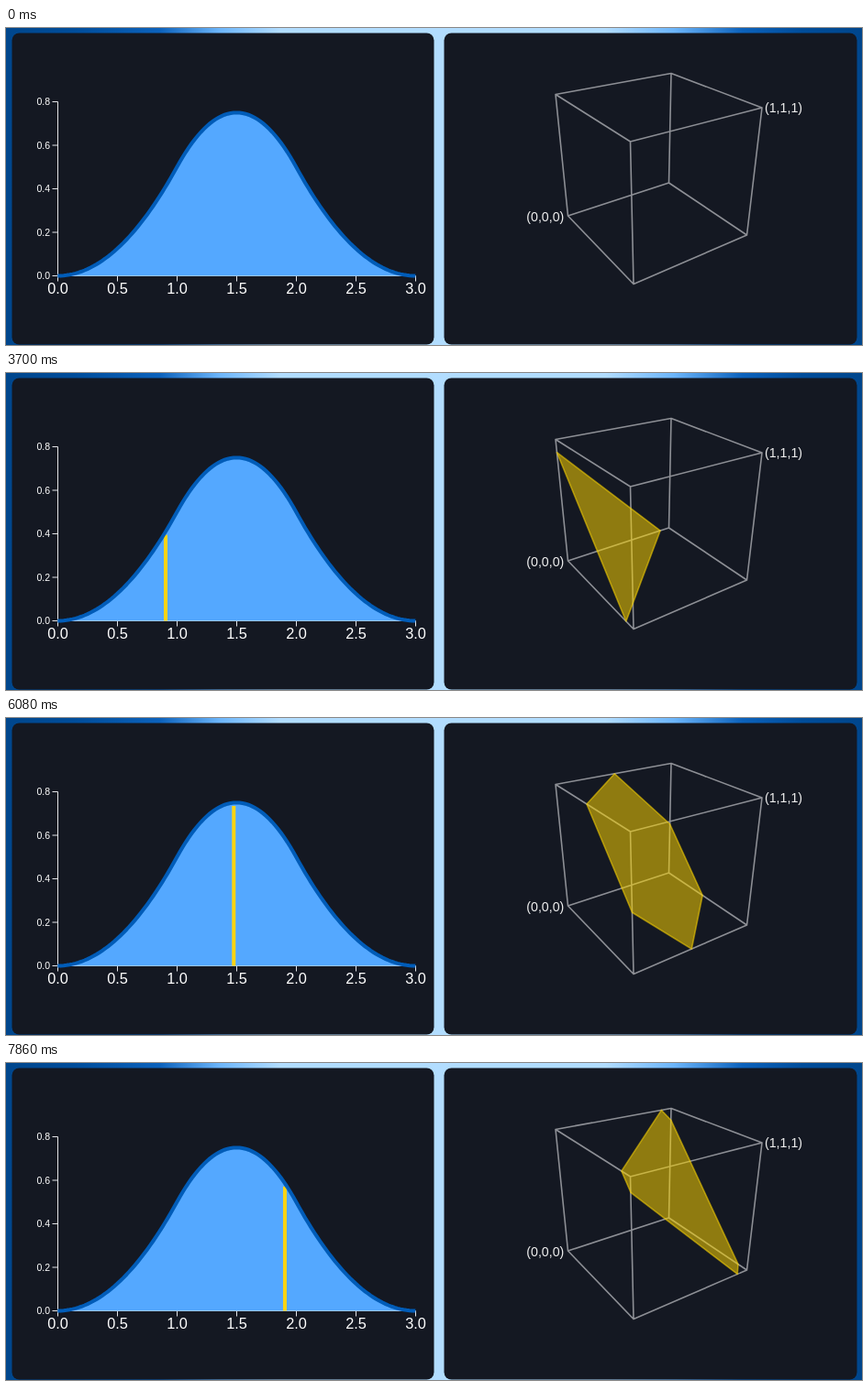
Animation, 933 px wide and 346 px high, one loop 8 s. Source, as an HTML page:

```html
<!DOCTYPE html>
<html lang="en">
<head>
<meta charset="utf-8">
<title>Density and cube section</title>
<style>
  html, body { margin: 0; width: 100%; height: 100%; overflow: hidden; background: #004a92; }
  svg { display: block; width: 933px; height: 346px; font-family: "Liberation Sans", Arial, sans-serif; fill: #fff; }
  .panel { fill: #141822; }
  .axis { fill: none; stroke: #e4e5e8; stroke-width: 1; }
  .area { fill: #54a8ff; }
  .curve { fill: none; stroke: #005cb8; stroke-width: 4; }
  .bar { fill: #fad414; }
  .cube { fill: none; stroke: #8d8f95; stroke-width: 1.6; stroke-linecap: round; }
  .plane { fill: #ffd700; fill-opacity: .52; stroke: #ffd700; stroke-opacity: .55; stroke-width: 1.6; stroke-linejoin: round; }
  .small { font-size: 10.5px; text-anchor: end; }
  .large { font-size: 16.3px; text-anchor: middle; }
  .corner { font-size: 14.2px; fill: #eee; }
</style>
</head>
<body>
<svg viewBox="0 0 933 346">
  <defs>
    <linearGradient id="sky">
      <stop offset="0" stop-color="#00468c"/>
      <stop offset=".08" stop-color="#004d9b"/>
      <stop offset=".18" stop-color="#0c62bc"/>
      <stop offset=".25" stop-color="#6db6fb"/>
      <stop offset=".32" stop-color="#b2ddff"/>
      <stop offset=".7" stop-color="#b2ddff"/>
      <stop offset=".78" stop-color="#6db6fb"/>
      <stop offset=".86" stop-color="#0c62bc"/>
      <stop offset=".93" stop-color="#004d9b"/>
      <stop offset="1" stop-color="#00468c"/>
    </linearGradient>
  </defs>
  <rect width="933" height="346" fill="url(#sky)"/>
  <rect class="panel" x="6.5" y="5.5" width="460" height="340" rx="8"/>
  <rect class="panel" x="477.5" y="5.5" width="450" height="340" rx="8"/>
  <g id="axes"></g>
  <path id="area" class="area"/>
  <rect id="bar" class="bar" width="4"/>
  <path id="curve" class="curve"/>
  <path id="cube" class="cube"/>
  <path id="plane" class="plane"/>
  <text class="corner" x="608.3" y="211" text-anchor="end">(0,0,0)</text>
  <text class="corner" x="827" y="91.5">(1,1,1)</text>
</svg>
<script>
const LOOP = 8000, STEP = 148.3, LAST_STEP = 53;
const get = id => document.getElementById(id);
const toPath = points => 'M' + points.map(p => p.map(v => v.toFixed(2)).join()).join('L');

// Chart: density of the sum of three uniform variables
const px = t => 56.3 + 130 * t;
const py = d => 270.5 - 237.5 * d;
const density = t =>
  t < 1 ? t * t / 2 : t < 2 ? 0.75 - (t - 1.5) ** 2 : (3 - t) ** 2 / 2;

function drawChart() {
  let ticks = 'M56.5 80.5V270.5H446.5', labels = '';
  for (let i = 0; i <= 4; i++) {
    const y = py(i * 0.2);
    ticks += `M50.5 ${y}H56.5`;
    labels += `<text class="small" x="48" y="${y + 3.6}">${(i * 0.2).toFixed(1)}</text>`;
  }
  for (let i = 0; i <= 6; i++) {
    const x = px(i / 2);
    ticks += `M${x + 0.2} 270.5v6`;
    labels += `<text class="large" x="${x + 0.2}" y="290.3">${(i / 2).toFixed(1)}</text>`;
  }
  get('axes').innerHTML = `<path class="axis" d="${ticks}"/>${labels}`;
  const points = Array.from({ length: 121 }, (_, i) => [px(i / 40), py(density(i / 40))]);
  get('curve').setAttribute('d', toPath(points));
  get('area').setAttribute('d', toPath(points) + 'Z');
}

// Cube: corner index bits are the three unit directions (up, front, back)
const corners = [
  [612.5, 205], [599, 72.5], [684, 279.5], [680.5, 124],
  [722.5, 169], [725, 49.5], [807.5, 226], [824, 87]
];
const bits = [1, 2, 4];
const slope = [-0.132, -0.188, 0.125];
const depth = i => 1 + bits.reduce((sum, b, k) => sum + (i & b ? slope[k] : 0), 0);
const level = i => bits.filter(b => i & b).length;
const edges = corners.flatMap((_, i) => bits.filter(b => !(i & b)).map(b => [i, i | b]));

// Perspective-correct point at fraction s of an edge
function along([a, b], s) {
  const wa = depth(a) * (1 - s), wb = depth(b) * s;
  return [0, 1].map(k => (corners[a][k] * wa + corners[b][k] * wb) / (wa + wb));
}

function section(t) {
  const points = edges
    .map(e => [e, t - level(e[0])])
    .filter(([, s]) => s >= 0 && s <= 1)
    .map(([e, s]) => along(e, s));
  const [cx, cy] = [0, 1].map(k => points.reduce((sum, p) => sum + p[k], 0) / points.length);
  const angle = p => Math.atan2(p[1] - cy, p[0] - cx);
  return points.sort((p, q) => angle(p) - angle(q));
}

function draw(ms) {
  const n = Math.min(LAST_STEP, Math.floor((ms + 12) / STEP));
  const t = 0.013 + 0.0357 * n;
  const height = Math.max(0, 237.5 * density(t) - 3.5);
  const bar = get('bar');
  bar.setAttribute('x', px(t) - 2);
  bar.setAttribute('y', 270.5 - height);
  bar.setAttribute('height', height);
  get('plane').setAttribute('d', n ? toPath(section(t)) + 'Z' : '');
}

drawChart();
get('cube').setAttribute('d', edges.map(e => toPath(e.map(i => corners[i]))).join(''));

const start = performance.now();
function tick() {
  draw((performance.now() - start) % LOOP);
  requestAnimationFrame(tick);
}
tick();
</script>
</body>
</html>
```
